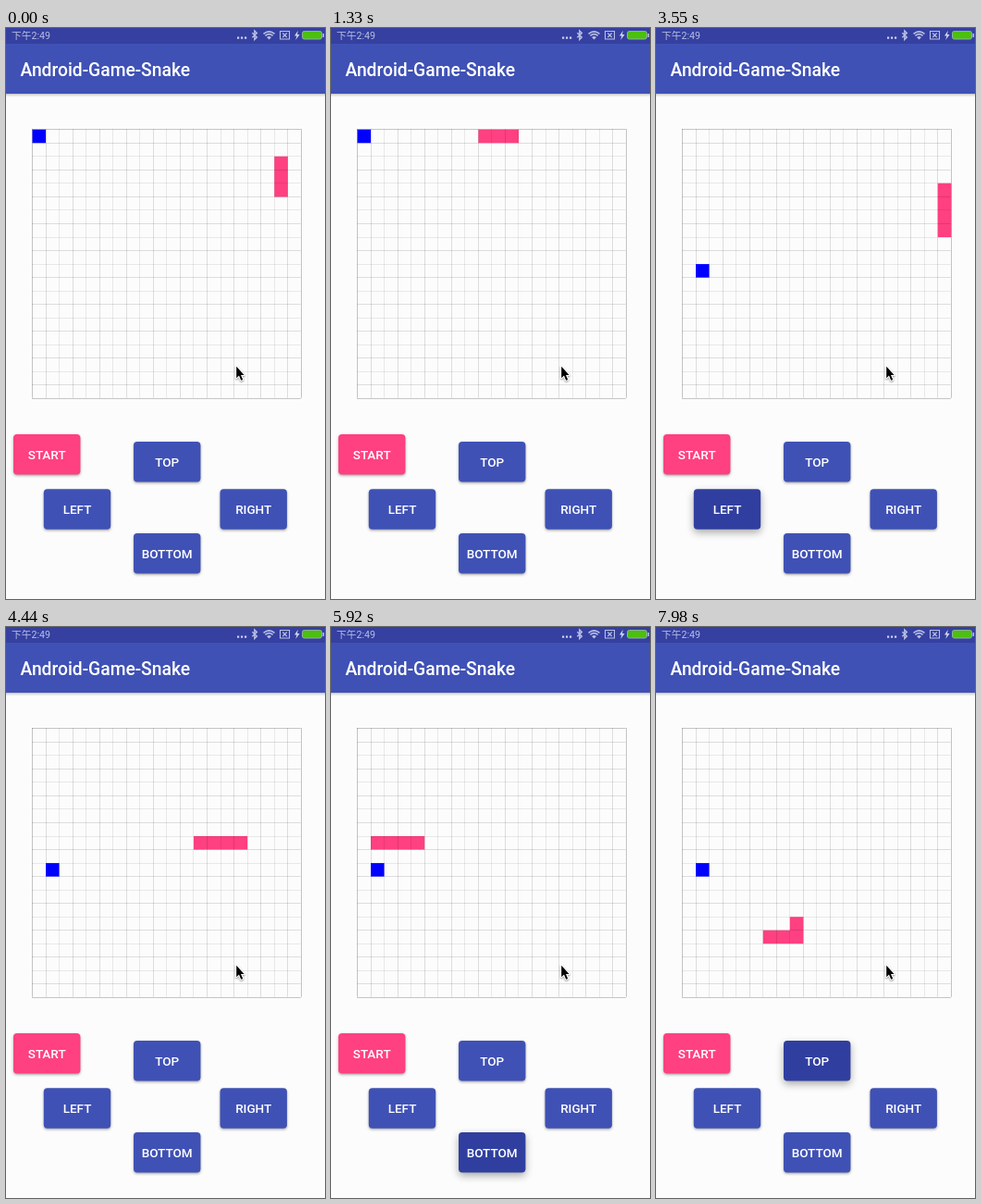
Recreate the animation shown at these times as an HTML page with a canvas. Size 345 by 617 pixels, loop 8 s.

```html
<!DOCTYPE html>
<html lang="en">
<head>
<meta charset="utf-8">
<title>Snake</title>
<style>
  html, body { margin: 0; width: 100%; height: 100%; overflow: hidden; background: #fcfcfc; }
  canvas { display: block; }
</style>
</head>
<body>
<canvas id="stage" width="345" height="617"></canvas>
<script>
const ctx = document.getElementById('stage').getContext('2d');
const LOOP = 8000, TICK = 147.9;
const GRID = { x: 28.5, y: 109.7, cell: 14.54, count: 20 };
const INDIGO = '#3f51b5', DARK = '#303f9f', PINK = '#ff4081', ICON = '#b9bfe3';

// Runs of moves, starting at the tail of the first pose; the board wraps around.
const DIRS = { U: [0, -1], D: [0, 1], L: [-1, 0], R: [1, 0] };
const path = [[18, 4]];
for (const run of ['U4', 'L19', 'D8', 'L19', 'D7', 'R8', 'U1']) {
  const [dx, dy] = DIRS[run[0]];
  for (let i = 0; i < +run.slice(1); i++) {
    const [x, y] = path[path.length - 1];
    path.push([(x + dx + 20) % 20, (y + dy + 20) % 20]);
  }
}
const MEAL = 20; // step at which the first food is eaten

// Presses are [first tick, last tick].
const buttons = [
  { label: 'START', x: 8, y: 439, color: PINK, presses: [] },
  { label: 'TOP', x: 138, y: 447, color: INDIGO, presses: [[53, 54]] },
  { label: 'LEFT', x: 40.8, y: 498.3, color: INDIGO, presses: [[2, 3], [24, 25]] },
  { label: 'RIGHT', x: 231.5, y: 498.3, color: INDIGO, presses: [[46, 47]] },
  { label: 'BOTTOM', x: 138, y: 546, color: INDIGO, presses: [[18, 19], [40, 41]] }
];

function rect(x, y, w, h, color) {
  ctx.fillStyle = color;
  ctx.fillRect(x, y, w, h);
}

function text(str, x, y, font, color, align = 'left') {
  ctx.font = font;
  ctx.fillStyle = color;
  ctx.textAlign = align;
  ctx.fillText(str, x, y);
}

function shadow(color, blur, offset) {
  ctx.shadowColor = color;
  ctx.shadowBlur = blur;
  ctx.shadowOffsetY = offset;
}

function line(d, color, width = 1) {
  ctx.strokeStyle = color;
  ctx.lineWidth = width;
  ctx.stroke(new Path2D(d));
}

function drawBars() {
  ctx.save();
  shadow('rgba(0,0,0,.3)', 3, 1);
  rect(-5, 17, 355, 54, INDIGO);
  ctx.restore();
  rect(0, 0, 345, 17, '#3540a1');
  text('下午2:49', 6, 12, '10.7px Roboto, "Noto Sans CJK SC", "Noto Sans CJK", sans-serif', ICON);
  text('Android-Game-Snake', 15.5, 52, '500 19.3px Roboto, sans-serif', '#fff');

  for (let i = 0; i < 3; i++) rect(250 + i * 4, 9.5, 2.2, 2.2, '#d0d4ee');
  line('M266.3 5.3 L271.3 10 L268.8 12.5 V3 L271.3 5.5 L266.3 10.2', ICON, 1.4);
  line('M278.5 6.3 Q284.5 1.5 290.5 6.3 M280.4 8.4 Q284.5 5 288.6 8.4', ICON, 1.6);
  ctx.fillStyle = ICON;
  ctx.fill(new Path2D('M282 9.9 Q284.5 8 287 9.9 L284.5 12.6 Z'));
  line('M296.5 3.5 H306.5 V12 H296.5 Z M299.3 5.5 L303.7 10 M303.7 5.5 L299.3 10', ICON, 1.1);
  ctx.fillStyle = '#d0d4ee';
  ctx.fill(new Path2D('M315.8 2.8 L312 8.6 H314.4 L313.2 13 L317.6 7 H315 Z'));
  ctx.beginPath();
  ctx.roundRect(320.5, 3.5, 21, 8.5, 2);
  ctx.fillStyle = '#4bc00f';
  ctx.fill();
  ctx.strokeStyle = '#8fae9c';
  ctx.lineWidth = 1;
  ctx.stroke();
  rect(342.5, 6, 1.5, 4, ICON);
}

function drawBoard(step) {
  const { x, y, cell, count } = GRID;
  const fillCells = (cells, color) => {
    ctx.beginPath();
    for (const [col, row] of cells) ctx.rect(x + col * cell, y + row * cell, cell, cell);
    ctx.fillStyle = color;
    ctx.fill();
  };
  const head = step + 2, length = step < MEAL ? 3 : 4;
  fillCells(path.slice(head - length + 1, head + 1), PINK);

  // Inner lines alternate in strength, as thin lines do when scaled down.
  for (let i = 0; i <= count; i++) {
    const alpha = i % count ? (i % 2 ? 0.12 : 0.08) : 0.22;
    const color = `rgba(0,0,0,${alpha})`;
    const offset = i * cell;
    rect(Math.floor(x + offset), Math.floor(y), 1, cell * count, color);
    rect(Math.floor(x), Math.floor(y + offset), cell * count, 1, color);
  }
  fillCells([step < MEAL ? [0, 0] : [1, 10]], '#0000ff');
}

function drawButton({ label, x, y, color, presses }, tick) {
  const pressed = presses.some(([from, to]) => tick >= from && tick <= to);
  ctx.save();
  if (pressed) shadow('rgba(0,0,0,.33)', 8, 3.5);
  else shadow('rgba(0,0,0,.36)', 3, 1.2);
  ctx.beginPath();
  ctx.roundRect(x, y, 72.4, 43.5, 4);
  ctx.fillStyle = pressed ? DARK : color;
  ctx.fill();
  ctx.restore();
  text(label, x + 36.2, y + 27, '500 13.5px Roboto, sans-serif', '#fff', 'center');
}

function drawCursor() {
  const arrow = new Path2D('M249.2 365.8 V378.2 L252 375.6 L254.2 380.8 L256.2 379.9 L254 374.9 H257.6 Z');
  ctx.save();
  ctx.lineJoin = 'round';
  ctx.strokeStyle = '#fff';
  ctx.lineWidth = 2;
  shadow('rgba(0,0,0,.4)', 2, 1);
  ctx.stroke(arrow);
  ctx.restore();
  ctx.fillStyle = '#000';
  ctx.fill(arrow);
}

function draw() {
  const tick = Math.floor((performance.now() % LOOP + 8) / TICK);
  rect(0, 0, 345, 617, '#fcfcfc');
  drawBars();
  drawBoard(Math.floor(tick * 1.185 + 0.48));
  for (const button of buttons) drawButton(button, tick);
  drawCursor();
  requestAnimationFrame(draw);
}
draw();
</script>
</body>
</html>
```
